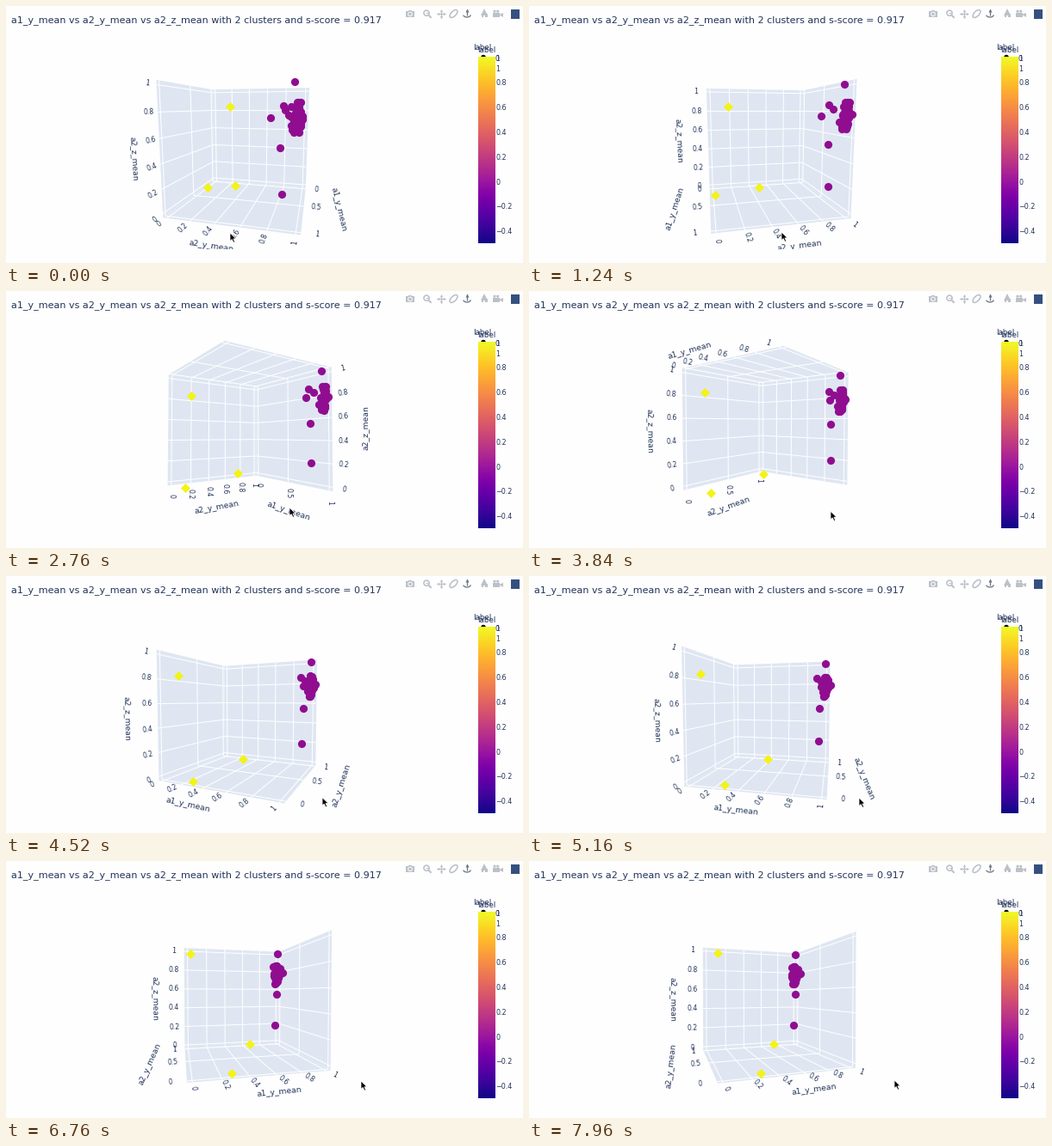
Recreate the animation shown at these times as a matplotlib script. Size 600 by 299 pixels, loop 8000 ms.

```python
import numpy as np
import matplotlib.pyplot as plt
from matplotlib.animation import FuncAnimation
from matplotlib.collections import LineCollection, PolyCollection
from matplotlib.patches import Circle, Polygon, Rectangle
from matplotlib.transforms import Bbox

W, H, DPI = 600, 299, 64
FRAMES, STEP = 200, 40
PT = 72 / DPI
INK, PANEL, PAPER = "#22345a", "#dfe6f2", "#fefefe"
GREY, ACTIVE = "#bcc1c9", "#6c7684"
PURPLE, YELLOW = "#900d90", "#f3f315"
CX, CY, FOCAL, DIST = 278, 161, 295, 2.165
SPREAD = 0.935  # share of a cube side taken by the range 0 to 1
TICK_GAP, TITLE_GAP = 0.1, 0.275
NAMES = ("a1_y_mean", "a2_y_mean", "a2_z_mean")

# Drag path: time, azimuth, elevation, pointer x
KEYS = np.array([
    (0, 15, 8.3, 260),
    (1240, -13.5, 7.5, 293),
    (2760, -35, -1.6, 329),
    (3840, -52, 1.9, 350),
    (5160, -76, 3.4, 383),
    (6760, -104.2, 1.6, 412),
    (7960, -109.3, 0.8, 424),
])
TIMES, POSES = KEYS[:, 0], KEYS[:, 1:]
SLOPES = np.gradient(POSES, TIMES, axis=0)

# Data in a cube centred on the origin
yellow = np.array([(-0.47, -0.296, 0.324), (-0.21, -0.453, -0.48), (0.015, -0.087, -0.367)])
outliers = np.array([
    (0.455, 0.43, 0.469), (0.41, 0.345, 0.045), (0.40, 0.36, -0.275),
    (0.425, 0.28, 0.245), (0.38, 0.36, 0.326), (0.42, 0.375, 0.297), (0.505, 0.405, 0.265),
])
rng = np.random.default_rng(4)
cloud = np.clip(rng.normal((0.455, 0.452, 0.255), (0.012, 0.018, 0.055), (48, 3)),
                (0.43, 0.41, 0.155), (0.48, 0.485, 0.345))
purple = np.vstack([outliers, cloud])

fig = plt.figure(figsize=(W / DPI, H / DPI), dpi=DPI, facecolor=PAPER)
ax = fig.add_axes([0, 0, 1, 1])
ax.axis("off")
scene_clip = Bbox([[0, H - 283], [W, H]])


def write(x, y, s, size, angle=0, ha="left", va="center_baseline", **kw):
    return ax.text(x, y, s, fontsize=size * PT, rotation=angle, ha=ha, va=va,
                   family="DejaVu Sans", color=INK, **kw)


def stroke(xs, ys, color=GREY, width=1.3):
    ax.plot(xs, ys, color=color, lw=width * PT, solid_capstyle="butt")


def box(x, y, w, h, color=GREY):
    ax.add_patch(Rectangle((x, y), w, h, fc=color, lw=0))


def disc(x, y, r, color=GREY, **kw):
    ax.add_patch(Circle((x, y), r, fc=color, **{"lw": 0, **kw}))


def wedge(x, y, marker, size, color=GREY):
    ax.plot(x, y, marker, ms=size * PT, color=color, mew=0)


def draw_toolbar():
    turn = np.linspace(0, 2 * np.pi, 40)
    mid = 9
    # snapshot
    box(464, 6, 10, 7)
    box(467, 5, 4, 2)
    disc(469, 9.4, 2.3, ec=PAPER, lw=1.1)
    # zoom
    disc(488, 8.2, 3.1, "none", ec=GREY, lw=1.6 * PT)
    stroke((490.2, 493.6), (10.4, 13.8), width=2)
    stroke((486.5, 489.5), (8.2, 8.2), width=1)
    # pan
    stroke((500, 509), (mid, mid))
    stroke((504.5, 504.5), (4.5, 13.5))
    for dx, dy, marker in ((4, 0, ">"), (-4, 0, "<"), (0, 4, "v"), (0, -4, "^")):
        wedge(504.5 + dx, mid + dy, marker, 3.2)
    # orbit
    stroke(519.5 + 4 * np.cos(turn) + 2 * np.sin(turn),
           mid - 4 * np.cos(turn) + 2 * np.sin(turn), width=1.6)
    # turntable
    stroke((535, 535), (4, 11), ACTIVE)
    wedge(535, 5, "^", 4, ACTIVE)
    stroke(535 + 4.2 * np.cos(turn[:20]), 10.4 + 2.6 * np.sin(turn[:20]), ACTIVE)
    # home
    wedge(555, 7, "^", 8.5)
    box(551.5, mid, 7, 4.4)
    box(554, 10.6, 2, 2.8, PAPER)
    # saved view
    box(565, 7.5, 7.5, 5.5)
    wedge(574, 10.2, "<", 5)
    for x in (567, 570.7):
        disc(x, 6.2, 1.6)
    box(585.5, 4, 10.5, 10.5, "#35507f")


def draw_colorbar():
    disc(554, 59.6, 2.8, "black")
    ax.imshow(np.linspace(1, 0, 256)[:, None], cmap="plasma", aspect="auto",
              extent=(547.5, 567, 276.5, 60), zorder=2)
    write(542.3, 51, "label", 8.8, va="baseline")
    write(547, 54.5, "label", 8.8, va="baseline")
    for k in range(-2, 6):
        write(568.5, 204 - 28.8 * k, f"{k / 5:g}".replace("-", "\u2212"), 8)
    write(567.5, 60, "0", 8)
    write(568, 72.5, "1", 8)


def pose(t):
    """Cubic ease through the drag path."""
    i = min(np.searchsorted(TIMES, t, side="right") - 1, len(TIMES) - 2)
    span = TIMES[i + 1] - TIMES[i]
    u = (t - TIMES[i]) / span
    h = u * u * (3 - 2 * u)
    bend = u * (1 - u) ** 2 * SLOPES[i] - u * u * (1 - u) * SLOPES[i + 1]
    return (1 - h) * POSES[i] + h * POSES[i + 1] + span * bend


def camera(azimuth, elevation):
    c, s = np.cos(np.radians(azimuth)), np.sin(np.radians(azimuth))
    ce, se = np.cos(np.radians(elevation)), np.sin(np.radians(elevation))
    right = np.array([-s, c, 0])
    up = np.array([-c * se, -s * se, ce])
    toward = np.array([c * ce, s * ce, se])

    def project(p):
        k = FOCAL / (DIST - p @ toward)
        return np.stack([CX + k * (p @ right), CY - k * (p @ up)], axis=-1)

    return project


def label_edges(far, azimuth, ceiling):
    """For each axis: the edge that carries its labels and the axis they move out along."""
    near = -far
    on_right = ceiling and azimuth > -45
    for axis in (0, 1):
        edge, other = np.zeros(3), 1 - axis
        if ceiling and (axis == 1 or on_right):
            edge[other], edge[2], out = far[other], -0.5, 2
        else:
            edge[other], edge[2], out = near[other], far[2], other
        yield axis, edge, out
    out = 0 if (near[0] * near[1] > 0) != on_right else 1
    edge = np.array([far[0], far[1], 0])
    edge[out] = near[out]
    yield 2, edge, out


def text_angle(a, b):
    dx, dy = b - a
    return (np.degrees(np.arctan2(-dy, dx)) + 91) % 180 - 91


def build_walls(project, far, ticks):
    faces, lines = [], []
    for n in range(3):
        a, b = [k for k in range(3) if k != n]
        quad = np.zeros((4, 3))
        quad[:, n] = far[n]
        quad[:, a] = (-0.5, 0.5, 0.5, -0.5)
        quad[:, b] = (-0.5, -0.5, 0.5, 0.5)
        faces.append(project(quad))
        for run, cross in ((a, b), (b, a)):
            for v in ticks[cross]:
                seg = np.zeros((2, 3))
                seg[:, n] = far[n]
                seg[:, cross] = SPREAD * (v - 0.5)
                seg[:, run] = (-0.5, 0.5)
                lines.append(project(seg))
    return faces, lines


ARROW = np.array([(0, 0), (0, 9.5), (2.2, 7.5), (4, 11.2), (5.6, 10.4), (3.9, 6.9), (6.9, 6.7)])
walls = ax.add_collection(PolyCollection([], facecolors=PANEL, linewidths=0, zorder=1))
grid = ax.add_collection(LineCollection([], colors="white", linewidths=PT, zorder=2))
dots = ax.scatter([], [], s=(9.2 * PT) ** 2, c=PURPLE, lw=0, zorder=5)
gems = ax.scatter([], [], s=(7.8 * PT) ** 2, c=YELLOW, marker="D", lw=0, zorder=5)
pointer = ax.add_patch(Polygon(ARROW, fc="black", ec="white", lw=0.8, zorder=8))
labels = []


def place(xy, s, size, angle):
    label = write(*xy, s, size, angle, ha="center", va="center", zorder=4, clip_on=True)
    label.set_clip_box(scene_clip)
    labels.append(label)


def draw_axis(project, axis, edge, out_axis, values):
    out = np.zeros(3)
    out[out_axis] = np.sign(edge[out_axis])
    along = np.eye(3)[axis]
    for v in values:
        base = edge + SPREAD * (v - 0.5) * along
        tip = project(base + TICK_GAP * out)
        place(tip, f"{v:g}", 7.8, text_angle(project(base), tip))
    mid = edge + TITLE_GAP * out
    xy = project(mid)
    angle = text_angle(project(mid - 0.1 * along), project(mid + 0.1 * along))
    if axis == 2:
        angle = 90 if xy[0] > CX else (angle if angle < 0 else angle - 180)
    place(xy, NAMES[axis], 9.2, angle)


def update(i):
    azimuth, elevation, pointer_x = pose(i * STEP)
    project = camera(azimuth, elevation)
    ceiling = -62 < azimuth < -20 and elevation < 2.6
    far = np.array([-0.5 if azimuth > -90 else 0.5,
                    -0.5 if azimuth > 0 else 0.5,
                    0.5 if ceiling else -0.5])
    fine, coarse = np.arange(6) / 5, np.arange(3) / 2
    ticks = (coarse, fine, fine) if azimuth > -45 else (fine, coarse, fine)

    faces, lines = build_walls(project, far, ticks)
    walls.set_verts(faces)
    grid.set_segments(lines)
    dots.set_offsets(project(purple))
    gems.set_offsets(project(yellow))
    pointer.set_xy(ARROW + (pointer_x, 254 + elevation / 0.83))

    for label in labels:
        label.remove()
    labels.clear()
    for axis, edge, out_axis in label_edges(far, azimuth, ceiling):
        draw_axis(project, axis, edge, out_axis, ticks[axis])
    return [walls, grid, dots, gems, pointer, *labels]


title = " vs ".join(NAMES) + " with 2 clusters and s-score = 0.917"
write(6.5, 19.5, title, 11.1, va="baseline")
draw_toolbar()
draw_colorbar()
ax.set(xlim=(0, W), ylim=(H, 0))

anim = FuncAnimation(fig, update, frames=FRAMES, interval=STEP, repeat=True,
                     repeat_delay=0, init_func=lambda: update(0), blit=False)
plt.show()
```
